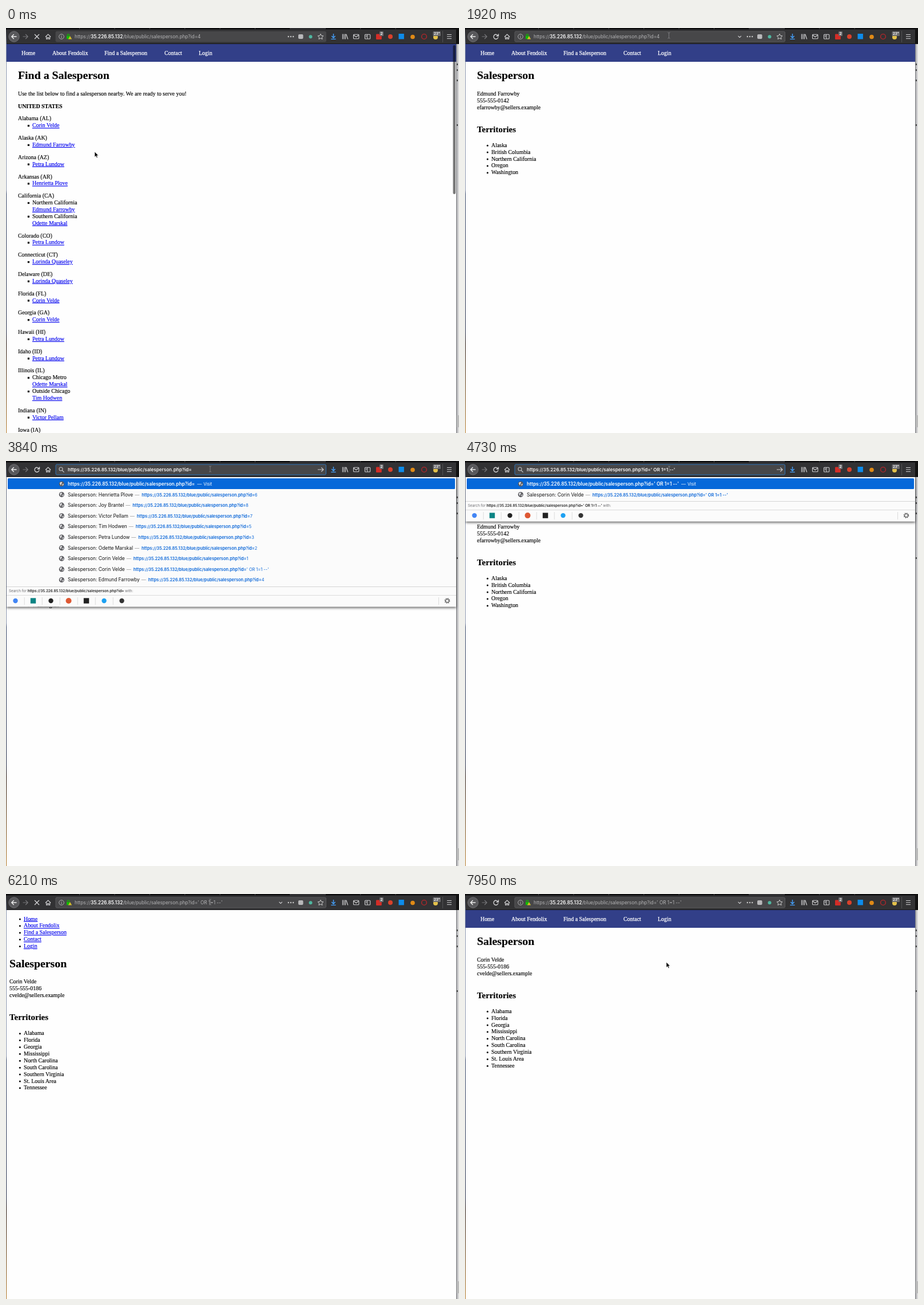
Write an HTML page that moves like this. It is 792 by 707 pixels and loops after 8000 ms.

```html
<!DOCTYPE html>
<html lang="en">
<head>
<meta charset="utf-8">
<title>Salesperson lookup</title>
<style>
html, body { margin: 0; width: 100%; height: 100%; overflow: hidden; background: #fefefe; }
svg { display: block; width: 792px; height: 707px; font-family: Inter, "Open Sans", sans-serif; }
.page { font: 9.92px "Liberation Serif", "Times New Roman", serif; }
.page text { stroke: #000; stroke-width: .15; }
.page .link { fill: #00e; stroke: #00e; text-decoration: underline; }
.page .nav { fill: #fff; stroke: #fff; stroke-width: .25; }
.h1 { font-size: 19.84px; font-weight: bold; }
.h2 { font-size: 14.88px; font-weight: bold; }
.bold { font-weight: bold; }
.popup { filter: drop-shadow(0 2px 2px #0009); }
</style>
</head>
<body>
<svg id="stage" viewBox="0 0 792 707"></svg>
<script>
const LOOP = 8000, LINE = 11.89, ROW = 18.61;
const stage = document.getElementById('stage');

const COMPANY = 'Fendolix';
const [CORIN, EDMUND, PETRA, HENRIETTA, ODETTE, LORINDA, TIM, VICTOR, JOY] = [
  'Corin Velde', 'Edmund Farrowby', 'Petra Lundow', 'Henrietta Plove', 'Odette Marskal',
  'Lorinda Quaseley', 'Tim Hodwen', 'Victor Pellam', 'Joy Brantel'];
const HOST = '35.226.85.132', PATH = '/blue/public/salesperson.php?id=';
const URL_BASE = 'https://' + HOST + PATH, INJECTION = "' OR 1=1 --'";

const MENU = [['Home', 27], ['About ' + COMPANY, 81], ['Find a Salesperson', 172], ['Contact', 277], ['Login', 337]];
const STATES = [
  ['Alabama (AL)', CORIN], ['Alaska (AK)', EDMUND], ['Arizona (AZ)', PETRA], ['Arkansas (AR)', HENRIETTA],
  ['California (CA)', 'Northern California', EDMUND, 'Southern California', ODETTE],
  ['Colorado (CO)', PETRA], ['Connecticut (CT)', LORINDA], ['Delaware (DE)', LORINDA],
  ['Florida (FL)', CORIN], ['Georgia (GA)', CORIN], ['Hawaii (HI)', PETRA], ['Idaho (ID)', PETRA],
  ['Illinois (IL)', 'Chicago Metro', ODETTE, 'Outside Chicago', TIM],
  ['Indiana (IN)', VICTOR], ['Iowa (IA)']];
const PEOPLE = [
  { info: [EDMUND, '555-555-0142', 'efarrowby@sellers.example'],
    areas: ['Alaska', 'British Columbia', 'Northern California', 'Oregon', 'Washington'] },
  { info: [CORIN, '555-555-0186', 'cvelde@sellers.example'],
    areas: ['Alabama', 'Florida', 'Georgia', 'Mississippi', 'North Carolina', 'South Carolina',
      'Southern Virginia', 'St. Louis Area', 'Tennessee'] }];
const HISTORY = [[HENRIETTA, 6], [JOY, 8], [VICTOR, 7], [TIM, 5], [PETRA, 3], [ODETTE, 2],
  [CORIN, 1], [CORIN, INJECTION], [EDMUND, 4]];

// Drawing helpers
const text = (x, y, s, cls = '') => `<text x="${x}" y="${y}" class="${cls}">${s}</text>`;
const ui = (x, y, size, fill, s, weight = 400) =>
  `<text x="${x}" y="${y}" font-size="${size}" fill="${fill}" font-weight="${weight}">${s}</text>`;
const span = (s, attrs) => `<tspan ${attrs}>${s}</tspan>`;
const rect = (x, y, w, h, fill, more = '') =>
  `<rect x="${x}" y="${y}" width="${w}" height="${h}" fill="${fill}" ${more}/>`;
const disc = (x, y, r, fill, more = '') => `<circle cx="${x}" cy="${y}" r="${r}" fill="${fill}" ${more}/>`;
const line = (d, color = '#d0d0d2', width = 1.2) =>
  `<path d="${d}" fill="none" stroke="${color}" stroke-width="${width}"/>`;
const shape = (d, fill) => `<path d="${d}" fill="${fill}"/>`;
const shift = (x, y, s) => `<g transform="translate(${x} ${y})">${s}</g>`;

const DEFS = `<defs>
<linearGradient id="left" x2="0" y2="1"><stop stop-color="#222"/><stop offset=".04" stop-color="#8b95ad"/>
<stop offset=".4" stop-color="#8b95ad"/><stop offset=".41" stop-color="#3b4a6b"/><stop offset=".75" stop-color="#27304a"/>
<stop offset=".78" stop-color="#2a1a12"/><stop offset="1" stop-color="#b57a28"/></linearGradient>
<linearGradient id="right"><stop stop-color="#77797d"/><stop offset=".5" stop-color="#c6c6c8"/>
<stop offset="1" stop-color="#e2e2e3"/></linearGradient></defs>`;

const edges = () => rect(0, 0, 1, 707, 'url(#left)') + rect(787, 28, 5, 679, 'url(#right)') +
  rect(787, 0, 5, 28, '#111') +
  [62, 72, 90, 168].map(y => rect(788, y, 2, 3, '#444')).join('') + rect(788, 676, 4, 21, '#bbb');

const navBar = () => rect(1, 28, 786, 31, '#323f88') + MENU.map(([s, x]) => text(x, 47, s, 'nav')).join('');

function listPage() {
  let y = 161.4;
  const list = STATES.map(([name, ...items]) => {
    let s = text(21, y, name);
    items.forEach((item, i) => {
      y += LINE;
      if (i % 2 === 0) s += rect(37.8, y - 4.2, 3.2, 3.2, '#000');
      s += text(46, y, item, items.length < 2 || i % 2 ? 'link' : '');
    });
    y += LINE + 9.92;
    return s;
  }).join('');
  return navBar() + text(21, 89.1, 'Find a Salesperson', 'h1') +
    text(21, 117.8, 'Use the list below to find a salesperson nearby. We are ready to serve you!') +
    text(21, 139.6, 'UNITED STATES', 'bold') + list +
    rect(781.5, 30, 4.5, 260, '#000', 'rx="2.2" opacity=".52"');
}

const bullets = (x, y, items, cls) => items.map((s, i) =>
  disc(x - 6.6, y + i * LINE - 2.6, 1.5, '#000') + text(x, y + i * LINE, s, cls)).join('');

function personPage({ info, areas }, styled) {
  const body = text(21, 89.1, 'Salesperson', 'h1') +
    info.map((s, i) => text(21, 117.8 + i * LINE, s)).join('') +
    text(21, 181.7, 'Territories', 'h2') + bullets(46, 207.8, areas);
  return styled ? navBar() + body
    : bullets(31, 46.5, MENU.map(m => m[0]), 'link') + shift(-15, 38.5, body);
}

function toolbar({ query, focused, typing, loading, hover, selected, caret }) {
  let s = rect(1, 0, 786, 28, '#323234') + rect(0, 0, 787, 2.4, '#0c0c0d') + rect(497, 0, 61, 2.4, '#323234') +
    rect(1, 27, 786, 1, '#18181a');
  for (let x = 128; x < 700; x += 61.4) s += rect(x, 0, 1, 2, '#48484a');
  s += disc(14, 15, 9.2, '#58585b', 'stroke="#78787b" stroke-width=".8"') +
    line('M18.5 15H10M13.8 11l-4 4 4 4', '#eee', 1.4) + line('M29.5 15H38M34.2 11l4 4-4 4', '#77777a') +
    line(loading ? 'M50 11l8 8M58 11l-8 8' : 'M57.5 13.2A4 4 0 1 0 58 16M58.5 10.3V14H54.8', '#d8d8da', 1.3) +
    line('M69 15.5l4.6-4.5 4.6 4.5M70.6 15V19.2H72.6V16.5H74.6V19.2H76.6V15') +
    rect(87, 6, 472.5, 18, '#474749', `rx="2" stroke="${focused ? '#2f74b8' : hover ? '#5a5a5d' : '#474749'}"`);

  if (typing) {
    s += disc(96, 14, 3, 'none', 'stroke="#c0c0c2" stroke-width="1.1"') + line('M98.2 16.3l3.4 3.4') +
      line('M545 15H555M551.3 11.3l3.7 3.7-3.7 3.7');
  } else {
    s += disc(97, 15, 4.3, 'none', 'stroke="#b8b8ba" stroke-width=".9"') + line('M97 14.3V17.5M97 12.3V13.3', '#b8b8ba', 1) +
      rect(106, 14, 6, 5.2, '#12bc00', 'rx=".6"') + line('M107.2 14V12.6a1.8 1.8 0 0 1 3.6 0V14', '#12bc00') +
      shape('M112 14l3.2 5.4h-6.4z', '#d4bd2a') +
      [493.8, 498, 502.2].map(x => disc(x, 15, 1.2, '#ccc')).join('') +
      rect(511, 11, 8.6, 8, '#b8b8ba', 'rx="2"') + disc(532.5, 15.3, 3, '#4fb7a0') +
      line('M550 10.3l1.5 3.1 3.4.4-2.5 2.3.7 3.4-3.1-1.7-3.1 1.7.7-3.4-2.5-2.3 3.4-.4z', '#ccc', 1) +
      (hover ? line('M477.5 13.8l2.7 2.7 2.7-2.7') : '');
  }
  if (selected) s += rect(120, 10, 222, 11, '#5675b9');
  const x = typing ? 108 : 120;
  s += focused ? ui(x, 18, 8.1, '#f9f9fa', URL_BASE + query, 600)
    : ui(x, 18, 8.25, '#b4b4b6', 'https://' + span(HOST, 'fill="#f9f9fa" font-weight="600"') + PATH + query);
  if (caret) s += rect(341.2, 10, .8, 11, '#f9f9fa');

  return s + line('M572.5 10V17M569.3 14l3.2 3.2 3.2-3.2M568.3 19.4H576.7', '#45a1ff', 1.4) +
    line('M588.5 10.5V19.5M591 10.5V19.5M593.5 10.5V19.5M594.7 10.8l3 8.7') +
    rect(607.5, 11.3, 9.4, 7.4, 'none', 'rx="1" stroke="#d0d0d2" stroke-width="1.1"') + line('M607.7 12.2l4.5 3.5 4.5-3.5') +
    rect(627.5, 11.2, 9.2, 7.8, 'none', 'rx="1" stroke="#d0d0d2" stroke-width="1.1"') + line('M632 11.2V19M629 13.3H631M629 15.3H631', '#d0d0d2', 1) +
    rect(647, 10.5, 9.8, 9.5, '#d32d27', 'rx="1"') + rect(653, 6, 7, 8, '#6b6b6e', 'rx="1"') + ui(654.4, 12.4, 6.5, '#fff', '2', 600) +
    disc(672, 15, 4, '#d9412b') + rect(686.5, 10, 9.4, 9.4, '#0d8bea') + disc(711, 15.5, 3.8, '#e08a16') +
    disc(731, 15, 4.4, 'none', 'stroke="#b5262b" stroke-width="1.4"') +
    disc(751, 16, 4, '#e3c14b') + rect(746.5, 6, 13.5, 8, '#6b6b6e', 'rx="1"') + ui(748, 12.3, 6.2, '#fff', '23°', 600) +
    rect(763, 5, .8, 20, '#5a5a5c') + line('M771 11.5H779M771 15H779M771 18.5H779');
}

const globe = y => disc(97.3, y, 4.6, '#5c5c60') +
  shape(`M94 ${y - 2}l3-1.6 1.4 1.8-2 1.2.4 2-1.4 .8zM98.6 ${y + .4}l2.2-.8-.6 2.6-1.6 1z`, '#e8e8ea');

function popup(query, rows, slots) {
  const full = URL_BASE + query, blue = '#0a66d8';
  let s = rect(1, 28, 786, 226.5 + (slots - 10) * ROW, '#fbfbfb') +
    rect(3, 30.3, 782, 18.6, '#0668d9', 'rx="1.5"') + globe(40) +
    ui(108, 43.1, 8.3, '#fff', full + span('—', 'dx="4" font-size="8" font-weight="400"') +
      span('Visit', 'dx="3" font-size="7.4" font-weight="400"'), 600);
  rows.forEach(([name, id], i) => {
    const y = 40 + (i + 1) * ROW, tail = id === query ? '' : id;
    s += globe(y) + ui(108, y + 3, 8.4, '#111', 'Salesperson: ' + name + span('—', 'dx="3" fill="#888" font-size="8"') +
      span(URL_BASE + (tail ? '' : id), `dx="4" fill="${blue}" font-size="7.4" font-weight="600"`) +
      span(tail, `fill="${blue}" font-size="7.4"`));
  });
  let bar = rect(1, 219, 786, .8, '#ccc') + rect(1, 234, 786, .8, '#d4d4d4') +
    ui(5, 228.8, 6.3, '#6a6a6e', 'Search for ' + span(full, 'fill="#222" font-weight="600"') + ' with:');
  ['#4285f4', '#0c8484', '#222', '#de5833', '#222', '#1da1f2', '#333'].forEach((c, i) => {
    const x = 16.5 + 31 * i;
    bar += i === 1 || i === 4 ? rect(x - 4.7, 239.3, 9.4, 9.4, c) : disc(x, 244, i === 3 ? 5 : 4.2, c);
    if (i < 6) bar += rect(x + 15.3, 238, .8, 13, '#d4d4d4');
  });
  bar += rect(756, 238, .8, 13, '#d4d4d4') + disc(771.5, 244, 2.8, 'none', 'stroke="#444"') +
    disc(771.5, 244, 4, 'none', 'stroke="#444" stroke-width="1.5" stroke-dasharray="1.57"');
  return `<g class="popup">${s}${shift(0, (slots - 10) * ROW, bar)}</g>`;
}

function pointerAt(t) {
  if (t < 150) return [155, 216];
  if (t < 410) return [157, 213];
  if (t < 1190) return [160, 211];
  if (t >= 7950) return [352, 119];
  if (t >= 2360) return [357, 14];
  const p = Math.min(1, (Math.floor((t - 1190) / 145) + 1) / 6), e = p * p * (3 - 2 * p);
  return [160 + 196.5 * e, 211 - 198 * e];
}

const pointer = ([x, y]) => shift(x, y, y < 24
  ? line('M-2-5Q0-5 0-4Q0-5 2-5M0-4V4M-2 5Q0 5 0 4Q0 5 2 5', '#8c8c8e', .8)
  : '<path d="M0 0V9.3L2.2 7.3 3.6 10.6 5.2 9.9 3.8 6.7H6.6Z" stroke="#fff" stroke-width=".6"/>');

function draw(t) {
  const within = (a, b) => t >= a && t < b;
  const spot = pointerAt(t);
  const query = t < 3550 ? '4' : t < 4140 ? '' : INJECTION;
  const styled = !within(710, 860) && !within(6210, 6360);
  const page = t < 710 ? listPage() : personPage(PEOPLE[t < 6210 ? 0 : 1], styled);
  const bar = toolbar({
    query, focused: within(2210, 5170), typing: within(3550, 5170),
    loading: t < 1340 || within(5320, 7050), hover: spot[1] < 24 || t >= 7950,
    selected: within(2210, 2950), caret: within(2950, 3250)
  });
  const rows = t < 4290 ? HISTORY : [HISTORY[7]];
  const results = within(3690, 5170) ? popup(query, rows, t < 4730 ? 10 : 2) : '';
  return DEFS + rect(0, 0, 792, 707, '#fefefe') + `<g class="page">${page}</g>` + edges() + results + bar + pointer(spot);
}

let shown = '';
function tick() {
  const next = draw(performance.now() % LOOP);
  if (next !== shown) stage.innerHTML = shown = next;
  requestAnimationFrame(tick);
}
tick();
</script>
</body>
</html>
```
